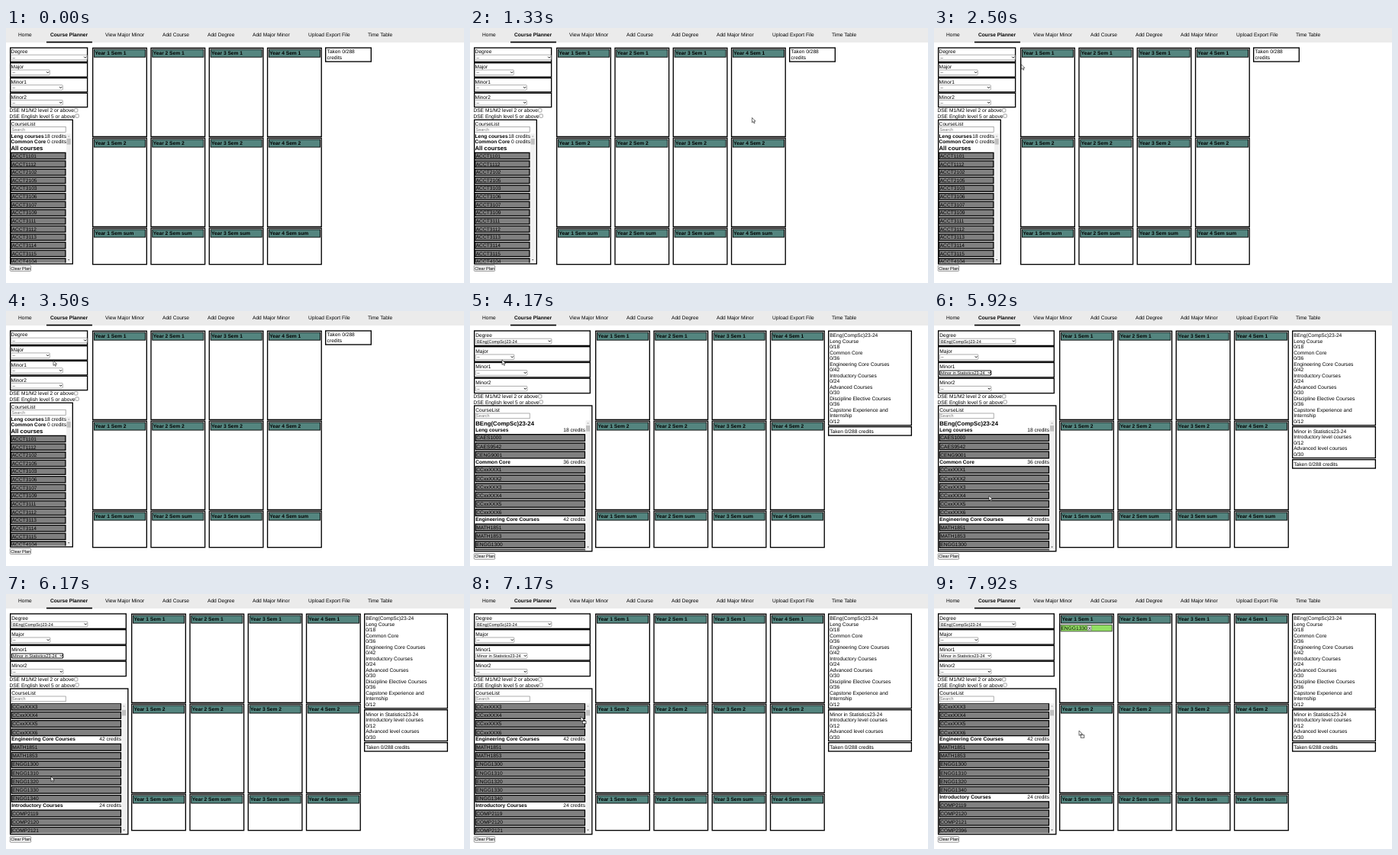
Write an HTML page that moves like this. It is 600 by 334 pixels and loops after 8000 ms.

```html
<!DOCTYPE html>
<html lang="en">
<head>
<meta charset="utf-8">
<title>Course Planner</title>
<style>
html, body { margin: 0; width: 600px; height: 334px; overflow: hidden; background: #fff; }
svg { display: block; font: 6.65px "Liberation Sans", Arial, sans-serif; text-rendering: geometricPrecision; }
text { white-space: pre; }
.b { font-weight: bold; }
.h { font-weight: bold; font-size: 7.78px; }
.s { font-size: 5.55px; }
.r { text-anchor: end; }
</style>
</head>
<body>
<svg width="600" height="334" viewBox="0 0 600 334">
  <defs><clipPath id="view"><rect id="clip"/></clipPath></defs>
  <g id="page"></g>
  <g clip-path="url(#view)"><g id="list"></g></g>
  <g id="bar"></g>
  <g id="cursor">
    <path d="M0 0V6.4L1.5 5 2.6 7.4 3.6 7 2.6 4.6H4.6Z" fill="#fff" stroke="#111" stroke-width=".6"/>
    <rect id="badge" x="2.2" y="5.8" width="4.6" height="3.4" fill="#fff" stroke="#222" stroke-width=".7"/>
  </g>
</svg>
<script>
const LOOP = 8000;
const T = { show: 1330, degree: 3670, focus: 4550, minor: 5170, scroll: 5950, scrolled: 6150, drag: 6600, drop: 7580 };
const SCROLL = 82.7;
const BORDER = 1.35;

// time, x, y of the pointer tip
const PATH = [
  [1330, 369.5, 117.5], [1500, 369.5, 117.5], [2250, 170, 60], [2700, 75, 39], [3250, 70, 41],
  [3500, 62, 65], [3670, 60, 64], [4170, 42, 64], [4500, 45, 80], [4850, 45, 82],
  [5170, 52, 108], [5850, 72, 242], [5920, 72, 242], [6170, 59, 239], [6550, 56, 256],
  [6700, 58, 256], [7500, 196, 105], [7600, 196, 105], [7920, 190, 179]
];

const NAV = [["Home", 16], ["Course Planner", 58], ["View Major Minor", 130], ["Add Course", 205],
  ["Add Degree", 264], ["Add Major Minor", 323], ["Upload Export File", 396], ["Time Table", 474]];
const ACCT = [1101, 1112, 2102, 2105, 3103, 3106, 3107, 3109, 3111, 3112, 3113, 3114, 3115, 4104];
const GROUPS = [
  ["Leng courses", 18, "CAES1000 CAES9542 CENG9001"],
  ["Common Core", 36, "CCxxXXX1 CCxxXXX2 CCxxXXX3 CCxxXXX4 CCxxXXX5 CCxxXXX6"],
  ["Engineering Core Courses", 42, "MATH1851 MATH1853 ENGG1300 ENGG1310 ENGG1320 ENGG1330 ENGG1340"],
  ["Introductory Courses", 24, "COMP2119 COMP2120 COMP2121 COMP2396"]
];

const $ = id => document.getElementById(id);
const text = (s, x, y, cls = "", fill = "#000") => `<text x="${x}" y="${y}" class="${cls}" fill="${fill}">${s}</text>`;
const fill = (x, y, w, h, c) => `<rect x="${x}" y="${y}" width="${w}" height="${h}" fill="${c}"/>`;

// outlined rectangle given by its outer edges
function box(x, y, r, b, line = BORDER, bg = "#fff", ink = "#000", rx = 0) {
  return `<rect x="${x + line / 2}" y="${y + line / 2}" width="${r - x - line}" height="${b - y - line}"
    rx="${rx}" fill="${bg}" stroke="${ink}" stroke-width="${line}"/>`;
}

function select(value, x, r, mid, focused) {
  const a = r - 4.4;
  return box(x, mid - 3.6, r, mid + 3.6, focused ? 1.2 : .6, "#fff", focused ? "#111" : "#777", .8) +
    text(value, x + 2, mid + 2, "s") +
    `<path d="M${a} ${mid - .9}l1.5 1.6 1.5-1.6" fill="none" stroke="#111" stroke-width="1"/>`;
}

const check = (x, y) => box(x, y, x + 4.9, y + 4.9, .6, "#fff", "#666", .8);
const course = (code, x, y, r, h) => box(x, y, r, y + h, BORDER, "#808080") + text(code, x + 1.7, y + h / 2 + 2.35);

function header() {
  return fill(0, 0, 600, 19, "#ebebeb") + fill(53, 17.7, 60, 1.7, "#000") +
    NAV.map(([s, x], i) => text(s, x, 11.2, i === 1 ? "b" : "")).join("");
}

function form(s) {
  const pitch = s.wide ? 20.75 : 19.75, right = s.wide ? 158 : 107.3, x = s.wide ? 7.2 : 6.6;
  const values = [s.wide ? "BEng(CompSc)23-24" : "--", "--", s.minor ? "Minor in Statistics23-24" : "--", "--"];
  let out = "";
  ["Degree", "Major", "Minor1", "Minor2"].forEach((label, i) => {
    const y = 25.3 + i * pitch;
    out += box(5, y, right, y + pitch) + text(label, x, y + (s.wide ? 8.6 : 8)) +
      select(values[i], x - .2, x + [100, 51, 68, 68][i], y + (s.wide ? 14.2 : 13.2), s.focus && i === 2);
  });
  const y = s.wide ? 114.3 : 110.3;
  out += text("DSE M1/M2 level 2 or above", 4.4, y) + check(89.3, y - 4.9) +
    text("DSE English level 5 or above", 4.4, y + 7.3) + check(90.7, y + 2.4);
  const top = s.wide ? 123.3 : 119.6, end = s.wide ? 315.4 : 309.6;
  out += box(5, top, s.wide ? 160.5 : 88, end) + text("CourseList", x, top + (s.wide ? 8.7 : 8.2)) +
    box(x - .3, top + (s.wide ? 10.4 : 9.6), 78.5, top + (s.wide ? 17.8 : 17), .6, "#fff", "#777") +
    text("Search", x + .9, top + (s.wide ? 16 : 15.3), "s", "#757575");
  const by = s.wide ? 317.2 : 310.4;
  return out + box(5, by, 33, by + 8.4, .6, "#efefef", "#666", 1) + text("Clear Plan", 6.3, by + 6.2, "s");
}

function plan(s) {
  const left = s.wide ? 164 : 113;
  let out = "";
  [["1", 25.6, 143], ["2", 143.5, 261], ["sum", 261.5, 310.3]].forEach(([sem, y, b]) => {
    for (let i = 0; i < 4; i++) {
      const x = left + i * 76.3;
      out += box(x, y, x + 72, b) + box(x + 2, y + 2, x + 70, y + 13, .9, "#54857f") +
        text(`Year ${i + 1} Sem ${sem}`, x + 3.4, y + 9.7, "b");
    }
  });
  if (s.placed) {
    out += box(165.6, 40.2, 233.6, 49.3, .8, "#92df62", "#333") + text("ENGG1330", 166.4, 47) +
      box(200.8, 41, 206.6, 48.4, .6, "#e6e6e6", "#666", .8) + text("X", 201.9, 46.8, "s");
  }
  return out;
}

function panel(lines, y, bottom) {
  return box(469, y, 579, bottom) + lines.map((s, i) => text(s, 471.2, y + 8.5 + i * 7.5)).join("");
}

function totals(s) {
  if (!s.wide) return box(418, 25.3, 479, 44.7) + text("Taken 0/288", 420.6, 33.3) + text("credits", 420.6, 40.8);
  const done = s.placed ? 6 : 0;
  let out = panel(["BEng(CompSc)23-24", "Leng Course", "0/18", "Common Core", "0/36",
    "Engineering Core Courses", done + "/42", "Introductory Courses", "0/24", "Advanced Courses", "0/30",
    "Discipline Elective Courses", "0/36", "Capstone Experience and", "Internship", "0/12"], 25.5, 150.4);
  if (s.minor) out += panel(["Minor in Statistics23-24", "Introductory level courses", "0/12",
    "Advanced level courses", "0/30"], 151, 193.2);
  const y = s.minor ? 194 : 151;
  return out + panel([`Taken ${done}/288 credits`], y, y + 12.7);
}

function courses(s) {
  if (!s.wide) {
    return text("Leng courses", 6.5, 143.9, "b") + text("18 credits", 79, 143.9, "r") +
      text("Common Core", 6.5, 151.2, "b") + text("0 credits", 79, 151.2, "r") + text("All courses", 6.5, 159.8, "h") +
      ACCT.map((n, i) => course("ACCT" + n, 6, 162.7 + i * 10.65, 78.6, 9.6)).join("");
  }
  let out = text("BEng(CompSc)23-24", 7.2, 150.3, "h"), y = 152.7;
  for (const [name, credits, codes] of GROUPS) {
    out += text(name, 7.2, y + 5.1, "b") + text(credits + " credits", 151, y + 5.1, "r");
    y += 8.3;
    for (const code of codes.split(" ")) {
      if (s.placed && code === "ENGG1330") continue;
      out += course(code, 6.6, y, 151.2, 10.1);
      y += 11.2;
    }
  }
  return out;
}

function scrollbar(s) {
  const x = s.wide ? 151.6 : 79.2, y = s.wide ? 143.4 : 138.4, b = s.wide ? 313 : 307.3, w = 6, m = x + w / 2;
  return fill(x, y, w, b - y, "#f1f1f1") +
    `<path d="M${m - 1.3} ${y + 4.2}l1.3-1.6 1.3 1.6Z" fill="#a3a3a3"/>
     <path d="M${m - 1.3} ${b - 4.4}l1.3 1.6 1.3-1.6Z" fill="#505050"/>
     <rect id="thumb" x="${x + .4}" y="${y + 6.6}" width="${w - .8}" height="7.6" fill="#c1c1c1"/>`;
}

function draw(s) {
  $("page").innerHTML = header() + form(s) + plan(s) + totals(s);
  $("list").innerHTML = courses(s);
  $("bar").innerHTML = scrollbar(s);
  const [y, b] = s.wide ? [143.2, 313.2] : [137.4, 307.4];
  for (const [k, v] of Object.entries({ x: 5, y, width: 150, height: b - y })) $("clip").setAttribute(k, v);
}

const ease = p => p * p * (3 - 2 * p);
const ramp = (t, a, b) => ease(Math.min(1, Math.max(0, (t - a) / (b - a))));

function pointer(t) {
  const i = PATH.findIndex(p => p[0] > t);
  if (i < 1) return (i < 0 ? PATH[PATH.length - 1] : PATH[0]).slice(1);
  const [t0, x0, y0] = PATH[i - 1], [t1, x1, y1] = PATH[i], p = ramp(t, t0, t1);
  return [x0 + (x1 - x0) * p, y0 + (y1 - y0) * p];
}

let last = "";
function tick() {
  const t = performance.now() % LOOP;
  const state = { wide: t >= T.degree, minor: t >= T.minor, focus: t >= T.focus && t < T.drag, placed: t >= T.drop };
  const key = JSON.stringify(state);
  if (key !== last) draw(state);
  last = key;

  const p = ramp(t, T.scroll, T.scrolled);
  $("list").setAttribute("transform", `translate(0 ${-SCROLL * p})`);
  $("thumb").setAttribute("transform", `translate(0 ${1.8 * p})`);
  $("cursor").setAttribute("transform", `translate(${pointer(t)})`);
  $("cursor").style.display = t < T.show ? "none" : "";
  $("badge").style.display = t < T.drag ? "none" : "";
  requestAnimationFrame(tick);
}
tick();
</script>
</body>
</html>
```
